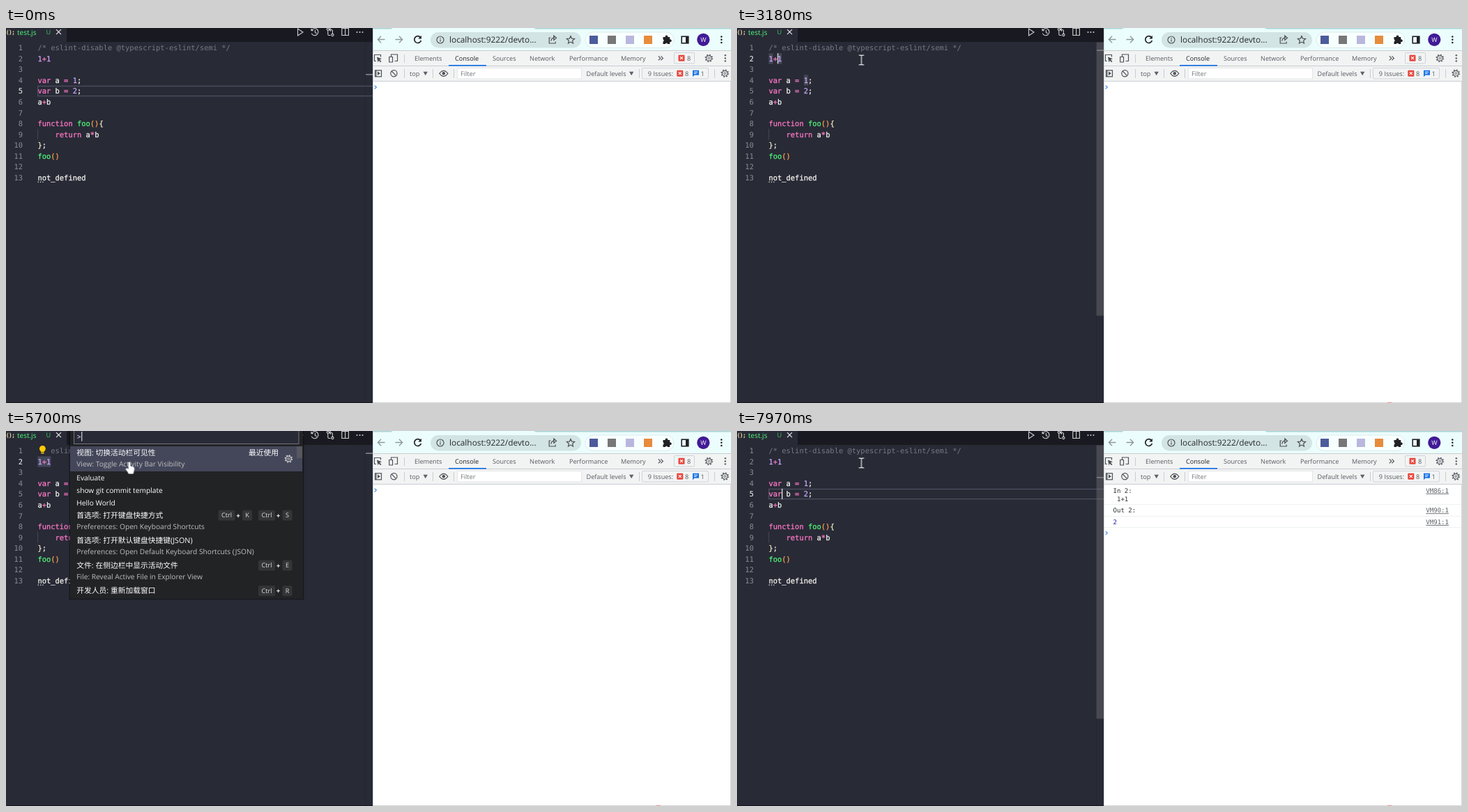
Animation of 1040x539 px, one loop 8000 ms. Source, as an HTML page:

```html
<!DOCTYPE html>
<html lang="en">
<head>
<meta charset="utf-8">
<title>Editor and console</title>
<style>
html, body { margin: 0; width: 100%; height: 100%; overflow: hidden; background: #fff; }
svg { display: block; }
text { white-space: pre; text-rendering: geometricPrecision; font: 9.15px "Open Sans", "Noto Sans CJK SC", "Noto Sans CJK JP", sans-serif; fill: #565a5f; }
.code text { font: 10.45px "DejaVu Sans Mono", monospace; fill: #f8f8f2; stroke: #f8f8f2; stroke-width: .25px; }
.code .c { fill: #777985; stroke: none; }
.code .n { fill: #c9a6fa; stroke: #c9a6fa; }
.code .k { fill: #ff79c6; stroke: #ff79c6; }
.code .f { fill: #50fa7b; stroke: #50fa7b; }
.code .o { fill: #ffa04d; stroke: #ffa04d; }
.code .y { fill: #f5efc4; stroke: #f5efc4; }
.code .num, .code .act { fill: #8b8c95; stroke: none; text-anchor: end; }
.code .act { fill: #e2e2e0; }
.line { fill: none; stroke: #4b4d5e; stroke-width: 1.4; }
.mark { fill: #85868c; }
.ico { fill: none; stroke: #d0d0d2; stroke-width: 1.1; }
.dk { fill: none; stroke: #4d5156; stroke-width: 1.2; }
.sep { stroke: #cacdd1; stroke-width: 1; }
.pal text { font-size: 10.2px; fill: #fff; }
.pal .zh { font-size: 10.75px; }
.pal .sub { fill: #c0c0c1; }
.pal .key { font-size: 9.1px; fill: #ddd; text-anchor: middle; }
.pal .plus { fill: #fff; stroke: #fff; stroke-width: .3px; }
.out text { font: 9.05px "DejaVu Sans Mono", monospace; fill: #303135; }
.out .src { fill: #5f6368; text-decoration: underline; }

/* 1% is 80 ms */
[class*="t-"] { animation: 8s step-end infinite; }
.t-five { animation-name: five; }
.t-two { animation-name: two; }
.t-box { animation-name: box; }
.t-three { animation-name: three; }
.t-same { animation-name: same; }
.t-sel { animation-name: sel; transform-origin: 64.4px 0; }
.t-bulb { animation-name: bulb; }
.t-thumb { animation-name: thumb; }
.t-caret { animation-name: caret; }
.t-pal { animation-name: pal; }
.t-blink { animation-name: blink; }
.t-row1 { animation-name: row1; }
.t-row2 { animation-name: row2; }
.pal .t-recent { animation-name: recent; }
.t-out { animation-name: out; }
.t-prompt { animation-name: prompt; }
.t-red { animation-name: red; }
.t-move { animation-name: move; }
.t-arrow { animation-name: arrow; }
.t-beam { animation-name: beam; }
.t-hand { animation-name: hand; }
.t-click { animation-name: click; }

@keyframes five { 0% { opacity: 1 } 26.375% { opacity: 0 } 99.625%, 100% { opacity: 1 } }
@keyframes two { 0% { opacity: 0 } 26.375% { opacity: 1 } 92.75%, 100% { opacity: 0 } }
@keyframes box { 0% { opacity: 0 } 26.375% { opacity: 1 } 39.75%, 100% { opacity: 0 } }
@keyframes three { 0% { opacity: 0 } 92.75% { opacity: 1 } 99.625%, 100% { opacity: 0 } }
@keyframes same { 0% { opacity: 0 } 39.75% { opacity: 1 } 43.875%, 100% { opacity: 0 } }
@keyframes sel {
  0% { opacity: 0; transform: scaleX(.333) }
  39.75% { opacity: 1; transform: scaleX(.333) }
  43.875% { opacity: 1; transform: scaleX(.667) }
  44.75% { opacity: 1; transform: none }
  92.75%, 100% { opacity: 0; transform: none }
}
@keyframes bulb { 0% { opacity: 0 } 44.75% { opacity: 1 } 96.75%, 100% { opacity: 0 } }
@keyframes thumb { 0% { opacity: 0 } 11.125% { opacity: 1 } 64.375% { opacity: .5 } 65.5% { opacity: 0 } 79.25%, 100% { opacity: 1 } }
@keyframes caret {
  0% { opacity: 0; transform: translate(64px, 36.2px) }
  26.375% { opacity: 1; transform: translate(64px, 36.2px) }
  33.125% { opacity: 0; transform: translate(64px, 36.2px) }
  39.75% { opacity: 1; transform: translate(57.8px, 36.2px) }
  43.875% { opacity: 1; transform: translate(51.5px, 36.2px) }
  44.75% { opacity: 1; transform: translate(45.2px, 36.2px) }
  50.875% { opacity: 0; transform: translate(45.2px, 36.2px) }
  79.25% { opacity: 1; transform: translate(45.2px, 36.2px) }
  85% { opacity: 0; transform: translate(45.2px, 36.2px) }
  90.875% { opacity: 1; transform: translate(45.2px, 36.2px) }
  92.75% { opacity: 1; transform: translate(45.2px, 51.8px) }
  99.625%, 100% { opacity: 1; transform: translate(64px, 82.9px) }
}
@keyframes pal { 0% { opacity: 0 } 58.5% { opacity: 1 } 79.25%, 100% { opacity: 0 } }
@keyframes blink { 0% { opacity: 1 } 64.375% { opacity: 0 } 71.25% { opacity: 1 } 78.125%, 100% { opacity: 0 } }
@keyframes row1 { 0% { fill: #44475a } 73.375%, 100% { fill: #323439 } }
@keyframes row2 { 0% { opacity: 0 } 73.375%, 100% { opacity: 1 } }
@keyframes recent { 0% { fill: #fff } 73.375%, 100% { fill: #7cd5e8 } }
@keyframes out { 0% { opacity: 0 } 80.25%, 100% { opacity: 1 } }
@keyframes prompt { 0% { transform: none } 80.25%, 100% { transform: translateY(61.5px) } }
@keyframes red { 0% { opacity: 0 } 26.375%, 100% { opacity: 1 } }
@keyframes move {
  0% { transform: translate(982px, 545px) }
  2.5% { transform: translate(980px, 532px) }
  8.125% { transform: translate(955px, 495px) }
  9.125% { transform: translate(820px, 405px) }
  10.125% { transform: translate(610px, 305px) }
  11.125% { transform: translate(375px, 220px) }
  12.125% { transform: translate(228px, 165px) }
  13.125% { transform: translate(208px, 137px); animation-timing-function: steps(4, end) }
  17.125% { transform: translate(184px, 83px) }
  18.25% { transform: translate(187px, 80px) }
  19.25% { transform: translate(190px, 78px) }
  20.125% { transform: translate(190px, 78px); animation-timing-function: steps(6, end) }
  26.375% { transform: translate(171.5px, 39.5px) }
  29.375% { transform: translate(175px, 43px) }
  31%, 100% { transform: translate(178.5px, 46px) }
}
@keyframes arrow { 0% { opacity: 0 } 2.5% { opacity: 1 } 11.125%, 100% { opacity: 0 } }
@keyframes beam { 0% { opacity: 0 } 11.125% { opacity: 1 } 57.5% { opacity: 0 } 78.125%, 100% { opacity: 1 } }
@keyframes hand { 0% { opacity: 0 } 57.5% { opacity: 1 } 78.125%, 100% { opacity: 0 } }
@keyframes click { 0% { opacity: 0 } 26.375% { opacity: .62 } 29.375% { opacity: .3 } 31%, 100% { opacity: 0 } }
</style>
</head>
<body>
<svg width="1040" height="539" viewBox="0 0 1040 539">
<defs>
  <g id="gear"><circle r="3.8" fill="none" stroke-width="1.2"/><circle r="5" fill="none" stroke-width="1.6" stroke-dasharray="1.96"/><circle r="1.4" fill="none"/></g>
  <g id="dots"><circle cy="-4.2" r="1.25"/><circle r="1.25"/><circle cy="4.2" r="1.25"/></g>
  <g id="err"><rect x="-4.5" y="-4.5" width="9" height="9" rx="1" fill="#e8453c"/><path d="M-2-2 2 2M2-2-2 2" stroke="#fff" stroke-width="1.2"/></g>
</defs>

<!-- editor -->
<rect width="526" height="539" fill="#282a36"/>
<rect width="526" height="20" fill="#191a21"/>
<rect width="87" height="20" fill="#282a36"/>
<path d="M515.5 20V538" stroke="#24262f"/>
<rect y="538" width="526" height="1" fill="#15161c"/>
<text x="-.3" y="9" style="font:bold 8.5px 'DejaVu Sans Mono',monospace;fill:#e8d9a0;letter-spacing:-1px">();</text>
<text x="16" y="9.8" style="font-size:10px;fill:#50fa7b">test.js</text>
<text x="57.5" y="9.4" style="fill:#41c468">U</text>
<path d="M72 2.2l7 7m0-7l-7 7" class="ico" style="stroke:#f0f0f0"/>
<g class="ico">
  <path d="M418.5 1v10l7.5-5z"/>
  <path d="M438.6 3.2A5 5 0 1 1 438.3 7.6M438 .8v3h3M443.4 3v3.4l2.4 1.4"/>
  <path d="M461.8 3.5V9q0 1.5 1.5 1.5h2.2M468.4 8.5V4q0-1.5-1.5-1.5h-2.4M466-.2 463.8 2.5l2.2 2"/><circle cx="461.8" cy="1.8" r="1.6"/><circle cx="468.4" cy="10" r="1.6"/>
  <path d="M481.8.5h9.6v10h-9.6zM486.6.5v10"/>
</g>
<g fill="#d0d0d2"><circle cx="503.5" cy="6" r="1"/><circle cx="507.5" cy="6" r="1"/><circle cx="511.5" cy="6" r="1"/></g>

<g class="t-five"><rect class="line" x="45.7" y="83.5" width="481" height="14.2"/><rect class="mark" x="516" y="66" width="10" height="1.6"/></g>
<g class="t-two"><rect class="mark" x="516" y="31.3" width="10" height="1.6"/></g>
<rect class="line t-box" x="45.7" y="36.9" width="481" height="14.2"/>
<g class="t-three"><rect class="line" x="45.7" y="52.4" width="481" height="14.2"/><rect class="mark" x="516" y="43" width="10" height="1.6"/></g>
<g class="t-same" fill="#434551"><rect x="45.4" y="36.4" width="6.3" height="15.4"/><rect x="95.9" y="67.4" width="6.3" height="15.4"/></g>
<rect class="t-sel" x="45.4" y="36.4" width="19" height="15.2" fill="#44475a"/>
<path d="M45.7 145v15.6" stroke="#474955"/>
<g class="code" id="code"></g>
<g fill="#c9c9cc"><circle cx="46.3" cy="221.4" r=".8"/><circle cx="49.6" cy="221.4" r=".8"/><circle cx="52.9" cy="221.4" r=".8"/></g>
<g class="t-bulb">
  <rect x="45" y="21" width="13.5" height="14" fill="#282a36"/>
  <path d="M52.4 21a4.4 4.4 0 0 1 2.5 8v1.3h-5V29a4.4 4.4 0 0 1 2.5-8zM50.3 31h4.2v1.6h-4.2z" fill="#ffcc00"/>
</g>
<rect class="t-caret" width="1.4" height="15.2" fill="#d6d6d2"/>
<rect class="t-thumb" x="515.5" y="20.5" width="10.5" height="393" fill="#79797966"/>

<!-- browser -->
<g>
  <rect x="526" width="514" height="539" fill="#fff"/>
  <rect x="527" width="513" height="33" fill="#ecfdfd"/>
  <path d="M527 0h28l-3 1.5h-25zM757 0h283v1.5H760z" fill="#a8d5d6"/>
  <rect x="609" y="6" width="216" height="22.4" rx="11.2" fill="#d3e4e4"/>
  <rect x="831" y="6" width="127" height="22.4" rx="11.2" fill="#f8ffff" stroke="#dcebeb"/>
  <g fill="none" stroke-width="1.4">
    <path d="M543.5 16.5h-10m4.6-4.7-4.7 4.7 4.7 4.7" stroke="#8f9a9d"/>
    <path d="M558.5 16.5h10m-4.6-4.7 4.7 4.7-4.7 4.7" stroke="#8f9a9d"/>
    <path d="M594.6 13.6A4.9 4.9 0 1 0 595.4 18" stroke="#202124" stroke-width="1.7"/>
  </g>
  <path d="M595.9 10.8v4.6h-4.6z" fill="#202124"/>
  <circle class="dk" cx="623" cy="17" r="5"/><path d="M623 16.2v3.6M623 14v1.3" class="dk"/>
  <text x="636" y="21" style="font-size:11.85px;fill:#26292c">localhost:9222/devto...</text>
  <path class="dk" d="M781.5 14h-2.3v8h9v-2.5M781.8 18.8q.5-4.6 5-4.6M785.8 11l3.7 3.2-3.7 3.2z"/>
  <path class="dk" d="M810 11.5l1.6 3.6 4 .4-3 2.7.9 3.9-3.5-2-3.5 2 .9-3.9-3-2.7 4-.4z"/>
  <rect x="837" y="11" width="12" height="12" fill="#4c5b9c"/>
  <rect x="863" y="11" width="12" height="12" fill="#777"/>
  <rect x="889" y="11" width="12" height="12" fill="#b9b7dd"/>
  <rect x="915" y="11" width="12" height="12" fill="#e78b3c"/>
  <path d="M942.5 13h3.2a1.9 1.9 0 1 1 3.6 0h3v3.4a1.9 1.9 0 1 1 0 3.6v3h-3.2a1.8 1.8 0 0 0-3.4 0h-3.2v-3.2a1.9 1.9 0 0 0 0-3.5z" fill="#202124"/>
  <rect x="969.2" y="12.2" width="9.6" height="9.6" fill="none" stroke="#202124" stroke-width="1.6"/><rect x="975" y="12" width="4" height="10" fill="#202124"/>
  <circle cx="1000.3" cy="16.8" r="9.1" fill="#411a96"/>
  <text x="1000.3" y="20" text-anchor="middle" style="fill:#fff;font-size:9px">W</text>
  <use href="#dots" x="1026.3" y="16.8" fill="#202124"/>

  <rect x="527" y="33" width="513" height="43" fill="#f2f4f4"/>
  <path class="sep" d="M527 32.5h513M527 54.5h513M527 76.5h513"/>
  <path class="sep" d="M571.5 38v12M571.5 59v13M612.5 59v13M642.5 59v13M908.5 59v13M1016.5 59v13"/>
  <path class="dk" d="M531 47.5h-2.5v-9h9v3"/><path d="M532 41.5l7 2.8-3 1.2 2.5 2.5-1.3 1.3-2.5-2.5-1.2 2.6z" fill="#4d5156"/>
  <path class="dk" d="M552.5 41v-3h9v9.5h-4M549.7 41.5h4.8v7.5h-4.8z"/>
  <g id="tabs"></g>
  <rect x="635" y="53" width="54" height="1.7" fill="#1a73e8"/>
  <path class="dk" d="M935.8 40.4l3 3-3 3m3.6-6 3 3-3 3"/>
  <g fill="none" stroke="#cfd2d6"><rect x="958.5" y="35.5" width="29" height="15.5" rx="1.5"/><rect x="912.5" y="57.5" width="95" height="15.5" rx="1.5"/></g>
  <use href="#err" x="969" y="43.2"/><text x="977" y="46.6">8</text>
  <use href="#gear" x="1008.3" y="43.4" stroke="#5f6368"/>
  <use href="#dots" x="1031.8" y="43.4" fill="#5f6368"/>

  <path class="dk" d="M529.5 60.8h9v9h-9zM531 60.8v9"/><path d="M533 62.5v5.6l4-2.8z" fill="#4d5156"/>
  <circle class="dk" cx="556.4" cy="65.3" r="4.6"/><path class="dk" d="M553.2 62l6.4 6.6"/>
  <text x="579" y="68.7">top</text><path d="M598.5 62.8h6.4l-3.2 5.4z" fill="#5f6368"/>
  <path class="dk" d="M621.8 65.3q6-8 12 0q-6 8-12 0z"/><circle cx="627.8" cy="65.3" r="2.2" fill="#4d5156"/>
  <rect x="647.5" y="57.5" width="178" height="15.5" fill="#fff" stroke="#e3e5e7"/>
  <text x="652" y="68.8" style="fill:#6f7377">Filter</text>
  <text x="832.5" y="68.7">Default levels</text><path d="M894 62.8h6.4l-3.2 5.4z" fill="#5f6368"/>
  <text x="920.8" y="68.7">9 Issues:</text>
  <use href="#err" x="966.8" y="65.2"/><text x="974" y="68.7">8</text>
  <path d="M985 60.8h9v7h-6.5l-2.5 2.4z" fill="#1a73e8"/><path d="M987 63.2h5m-5 2.2h3.5" stroke="#fff"/><text x="996.5" y="68.7">1</text>
  <use href="#gear" x="1031.2" y="65.2" stroke="#5f6368"/>
  <path d="M528.6 82.7l2.8 2.4-2.8 2.4" class="t-prompt" fill="none" stroke="#4a8fe8" stroke-width="1.2"/>
  <g class="out t-out">
    <path d="M527 105.5h513M527 122.5h513M527 138.5h513" stroke="#eff0f1"/>
    <text x="539.5" y="88.8">In 2:</text><text x="539.5" y="101.3"> 1+1</text>
    <text x="539.5" y="117.3">Out 2:</text><text x="539.5" y="134.2" style="fill:#1a1aa6">2</text>
    <text class="src" x="988.3" y="88.8">VM86:1</text><text class="src" x="988.3" y="117.3">VM90:1</text><text class="src" x="988.3" y="134.2">VM91:1</text>
  </g>
  <path d="M526.5 0v539" stroke="#c9d3d5"/>
  <path d="M527 538.5h513M1039.5 77v462" stroke="#d4d6d8"/>
  <rect class="t-red" x="933" y="538" width="6" height="1" fill="#e98a84"/>
</g>

<!-- command palette -->
<g class="t-pal">
  <rect x="90" y="-4" width="338" height="247" fill="#000" opacity=".18"/>
  <rect x="91" y="-4" width="336" height="246" fill="#000" opacity=".25"/>
  <rect x="92" y="-2" width="334" height="243" fill="#222325"/>
  <rect x="97.5" y="-3" width="322.5" height="21.5" fill="#282a36" stroke="#73747c"/>
  <rect class="t-row1" x="92" y="22" width="333" height="36"/>
  <rect class="t-row2" x="92" y="58" width="333" height="18" fill="#44475a"/>
  <rect x="417" y="22" width="8" height="17" fill="#56575f"/>
  <g class="pal" id="pal">
    <text x="101.8" y="12">&gt;</text>
    <text class="zh t-recent" x="348" y="34.8">最近使用</text>
  </g>
  <rect class="t-blink" x="108.2" y="1" width="1.1" height="13.6" fill="#e4e4e4"/>
  <use href="#gear" x="405.3" y="40" stroke="#c8c8c8"/>
  <g class="t-row2"><use href="#gear" x="405.3" y="67.2" stroke="#c8c8c8"/></g>
</g>

<!-- pointer -->
<g class="t-move">
  <circle class="t-click" cx="-1.7" cy="-.5" r="9.6" fill="#f4ea14"/>
  <path class="t-arrow" d="M0 0v13l3-2.8 2 4.6 2-.9-2-4.5h4z" fill="#fff" stroke="#222" stroke-width=".8"/>
  <path class="t-beam" d="M-3.6-6.8h2.6l1 .8 1-.8h2.6M0-6V6M-3.6 6.8h2.6l1-.8 1 .8h2.6" fill="none" stroke="#f2f2f2" stroke-width="1.2"/>
  <path class="t-hand" d="M-2.6 0q0-1.2 1.1-1.2T-.4 0v4.8l4 .7q2 .5 1.8 2.5l-.7 4.2-.8 3h-6.6l-.7-1.8-2.8-4.2q-.5-1.4 1-1.6l2.6 1.8z" fill="#fff" stroke="#fff" stroke-width=".6"/>
</g>
</svg>
<script>
const $ = id => document.getElementById(id);
const text = (x, y, s, cls = '') => `<text x="${x}" y="${y}" class="${cls}">${s}</text>`;
const add = (id, html) => $(id).insertAdjacentHTML('beforeend', html);

// {class:text} marks a coloured token
const code = [
  '{c:/* eslint-disable @typescript-eslint/semi */}',
  '{n:1}{k:+}{n:1}', '',
  '{k:var} a {k:=} {n:1};',
  '{k:var} b {k:=} {n:2};',
  'a{k:+}b', '',
  '{k:function} {f:foo}{o:()}{y:{}',
  '    {k:return} a{k:*}b',
  '{y:}};',
  '{f:foo}{o:()}', '',
  'not_defined'
];
const paint = s => s.replace(/\{(\w):(.[^}]*|\})\}/g, '<tspan class="$1">$2</tspan>');
const base = i => 32.1 + 15.58 * i;
add('code', code.map((s, i) => text(24, base(i), i + 1, 'num') + text(45.4, base(i), paint(s))).join(''));
for (const [n, cls] of [[2, 'two'], [3, 'three'], [5, 'five']])
  add('code', text(24, base(n - 1), n, 'act t-' + cls));

const tabs = { Elements: 586, Console: 644, Sources: 698, Network: 751, Performance: 808, Memory: 882 };
for (const [name, x] of Object.entries(tabs))
  add('tabs', `<text x="${x}" y="46.8" ${name === 'Console' ? 'style="fill:#202124"' : ''}>${name}</text>`);

const rows = [
  [31, '视图: 切换活动栏可见性', 'View: Toggle Activity Bar Visibility'],
  [67, 'Evaluate'], [85, 'show git commit template'], [103, 'Hello World'],
  [121, '首选项: 打开键盘快捷方式', 'Preferences: Open Keyboard Shortcuts', 'KS'],
  [157, '首选项: 打开默认键盘快捷键(JSON)', 'Preferences: Open Default Keyboard Shortcuts (JSON)'],
  [193, '文件: 在侧边栏中显示活动文件', 'File: Reveal Active File in Explorer View', 'E'],
  [229.5, '开发人员: 重新加载窗口', '', 'R']
];
const cap = (x, y, w, s) =>
  `<rect x="${x}" y="${y - 7.2}" width="${w}" height="15" rx="2" fill="#343537"/>` + text(x + w / 2, y + 3.4, s, 'key');
const chord = (x, y, s) => cap(x, y, 24, 'Ctrl') + text(x + 28.7, y + 3.9, '+', 'key plus') + cap(x + 34.5, y, 14, s);
for (const [y, title, sub = '', keys = ''] of rows) {
  const zh = title.charCodeAt(0) > 255;
  add('pal', text(101.3, y + 3.8, title, zh ? 'zh' : '') + text(101.3, y + 20.4, sub, 'sub'));
  [...keys].reverse().forEach((k, i) => add('pal', chord(362 - 57.5 * i, y, k)));
}
</script>
</body>
</html>
```
